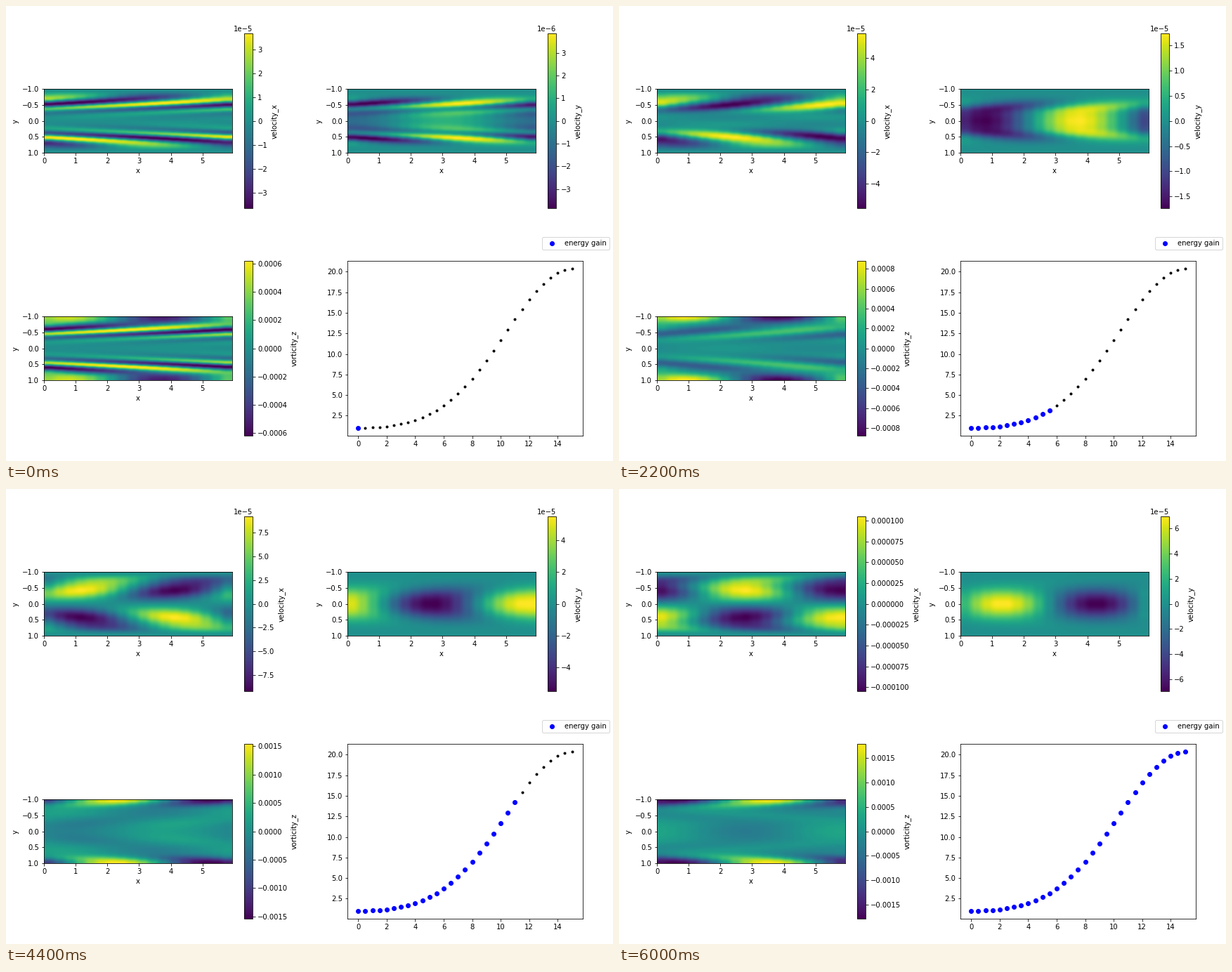
These frames come from a looping animation (864 by 648 pixels, 6.2 s). A matplotlib script:

```python
"""Optimal 2D perturbation of plane Poiseuille flow and its transient growth."""
import numpy as np
import matplotlib.pyplot as plt
from matplotlib.animation import FuncAnimation

RE, T_END, STEPS = 3000, 15.0, 30
N, NX, MODES = 90, 18, 27
PEAK_X, PEAK_U = 1.22, 1.0516e-4   # final crest position and amplitude


def cheb(n):
    y = np.cos(np.pi * np.arange(n + 1) / n)
    c = np.ones(n + 1)
    c[[0, -1]] = 2
    c *= (-1.0) ** np.arange(n + 1)
    d = np.outer(c, 1 / c) / (y[:, None] - y + np.eye(n + 1))
    return y, d - np.diag(d.sum(axis=1))


# Derivatives acting on v, even in y and clamped at both walls
y, D = cheb(N)
half = N // 2
even = np.zeros((N - 1, half))
for i in range(half):
    even[i, i] = even[N - 2 - i, i] = 1
G0 = np.zeros((N + 1, half))
G0[1:-1] = even
S = np.zeros((N + 1, half))
S[1:-1] = even / (1 - y[1:-1, None] ** 2)
yc = y[:, None]
bump = 1 - yc ** 2
D2 = D @ D
D3 = D2 @ D
D4 = D2 @ D2
G1 = (bump * D - 2 * np.diag(y)) @ S
G2 = (bump * D2 - 4 * yc * D - 2 * np.eye(N + 1)) @ S
G4 = (bump * D4 - 8 * yc * D3 - 12 * D2) @ S
lap = D2 @ G0 - G0

# Orr-Sommerfeld modes for wavenumber 1
bilap = G4 - 2 * (D2 @ G0) + G0
rhs = bilap / RE - 1j * bump * lap - 2j * G0
rows = slice(1, half + 1)
lam, V = np.linalg.eig(np.linalg.solve(lap[rows], rhs[rows]))
keep = np.argsort(-lam.real)[:MODES]
lam, V = lam[keep], V[:, keep]

# Optimal initial state in the energy norm
w = np.sqrt(np.pi / N * np.sin(np.pi * np.arange(N + 1) / N))[:, None]
R = np.linalg.qr(np.vstack([w * G0, w * G1]) @ V)[1]
prop = (R * np.exp(lam * T_END)) @ np.linalg.inv(R)
a0 = np.linalg.solve(R, np.linalg.svd(prop)[2][0].conj())

x = 2 * np.pi * np.arange(NX) / NX
wave = np.exp(1j * x)


def fields(t):
    q = V @ (np.exp(lam * t) * a0)
    v, u = G0 @ q, 1j * (G1 @ q)
    vort = 1j * (G0 @ q - G2 @ q)
    return [np.outer(f, wave).real for f in (u, v, vort)]


times = np.linspace(0, T_END, STEPS + 1)
energy = np.array([np.linalg.norm(R @ (np.exp(lam * t) * a0)) ** 2 for t in times])
gain = energy / energy[0]

mid = (V @ (np.exp(lam * T_END) * a0))[-1]
a0 = a0 * np.exp(-1j * (PEAK_X + np.angle(mid)))
a0 = a0 * PEAK_U / fields(T_END)[0].max()

# Layout
fig = plt.figure(figsize=(12, 9), dpi=72)
panels = fig.subfigures(2, 2).flatten()
images = []
names = ("velocity_x", "velocity_y", "vorticity_z")
for panel, name, data in zip(panels, names, fields(0)):
    ax = panel.subplots()
    im = ax.imshow(data, extent=(0, x[-1], 1, -1), cmap="viridis",
                   interpolation="hanning")
    ax.set_xlabel("x")
    ax.set_ylabel("y")
    panel.colorbar(im, ax=ax, label=name)
    images.append(im)

ax = panels[3].subplots()
ax.plot(times, gain, "k.")
dots, = ax.plot(times[:1], gain[:1], "bo", label="energy gain")
panels[3].legend()


def update(n):
    for im, data in zip(images, fields(times[n])):
        im.set_data(data)
        im.autoscale()
    dots.set_data(times[:n + 1], gain[:n + 1])
    return [*images, dots]


anim = FuncAnimation(fig, update, frames=STEPS + 1, interval=200, repeat=True)
plt.show()
```
